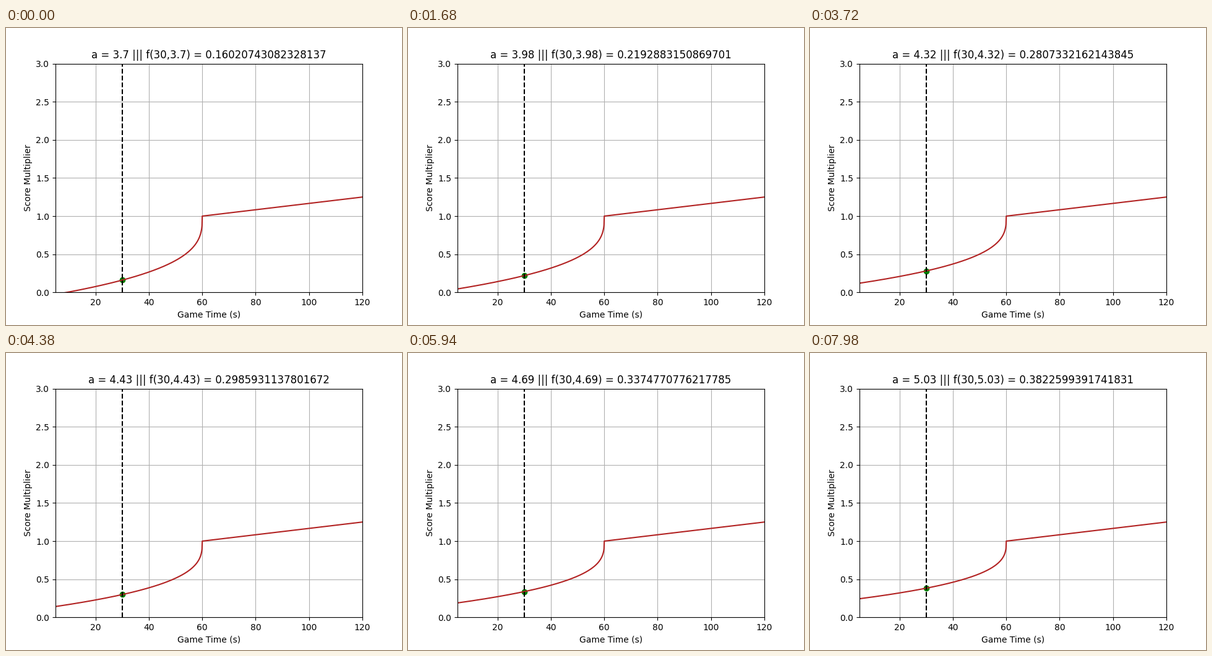
Recreate the animation shown at these times as a matplotlib script. Size 640x480 px, loop 8 s.

```python
import matplotlib.pyplot as plt
import numpy as np
from matplotlib.animation import FuncAnimation

TICK = 20            # ms per drawn frame
HOLD = 3             # drawn frames per step of a
FRAMES = 400
A_START, A_STEP = 3.7, 0.01
T_MARK, T_KNEE = 30, 60


def multiplier(t, a):
    """Cube-root rise up to the knee, then a gentle straight line."""
    rise = 1 + np.cbrt(t - T_KNEE) / a
    line = 1 + (t - T_KNEE) / 240
    return np.where(t < T_KNEE, rise, line)


times = np.linspace(5, 120, 1151)

fig, ax = plt.subplots(figsize=(6.4, 4.8), dpi=100)
ax.set_xlim(5, 120)
ax.set_ylim(0, 3)
ax.set_xlabel("Game Time (s)")
ax.set_ylabel("Score Multiplier")
ax.grid(True)

curve, = ax.plot(times, multiplier(times, A_START), color="firebrick")
ax.axvline(T_MARK, color="black", linestyle="--")
dot = ax.scatter([T_MARK], [0], color="green")
title = ax.set_title("")


def update(i):
    a = round(A_START + A_STEP * (i // HOLD), 2)
    value = float(multiplier(T_MARK, a))
    curve.set_ydata(multiplier(times, a))
    dot.set_offsets([[T_MARK, value]])
    title.set_text(f"a = {a} ||| f({T_MARK},{a}) = {value}")
    return curve, dot, title


anim = FuncAnimation(fig, update, frames=FRAMES, interval=TICK,
                     init_func=lambda: update(0), repeat=True, repeat_delay=0)
plt.show()
```
